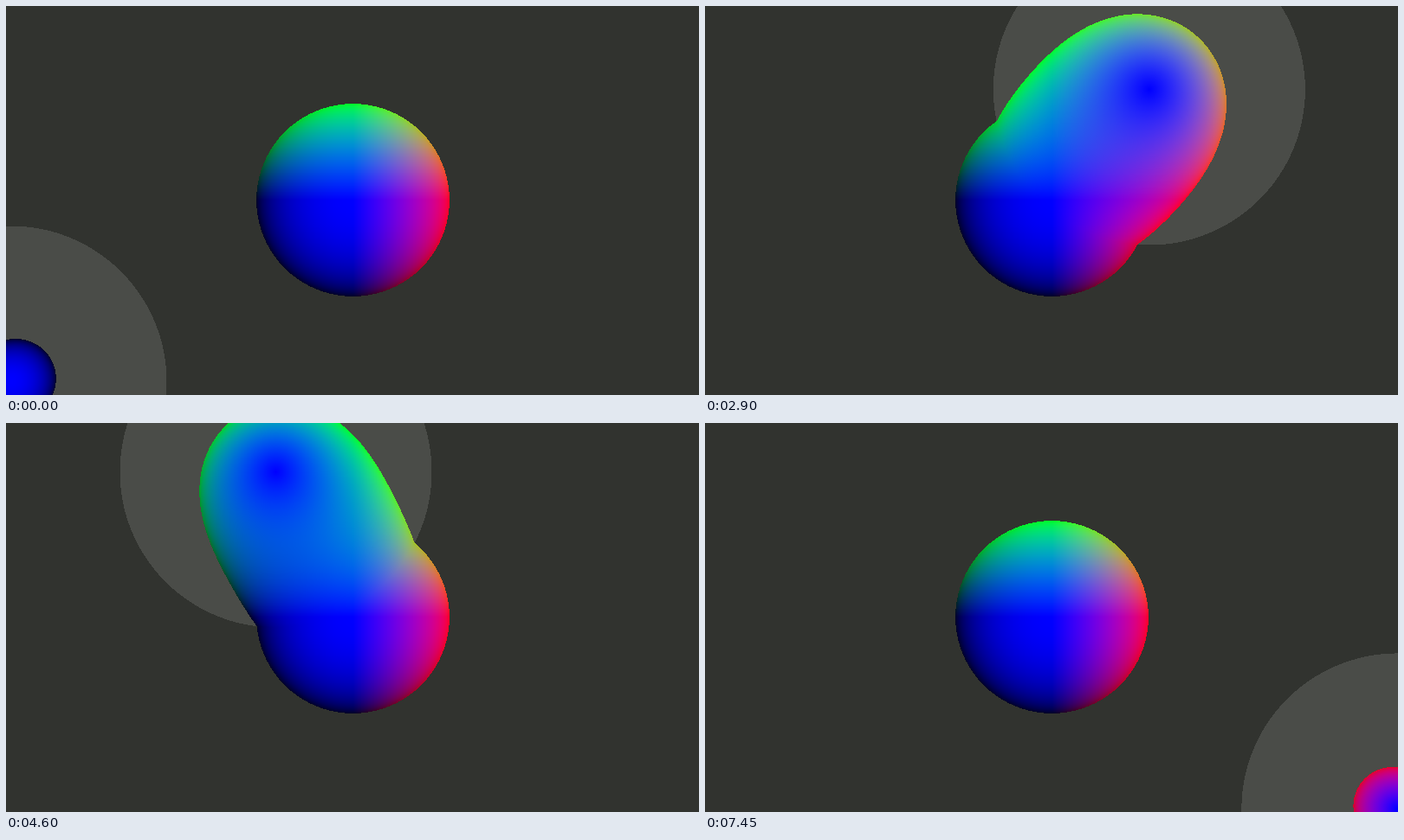
An HTML page with a canvas that plays this animation: 800 px wide and 450 px high, repeating every 7500 ms.

```html
<!DOCTYPE html>
<html lang="en">
<head>
<meta charset="utf-8">
<title>Merging blobs</title>
<style>
  html, body { margin: 0; width: 100%; height: 100%; overflow: hidden; background: #31332f; }
  canvas { display: block; width: 800px; height: 450px; }
</style>
</head>
<body>
<canvas id="stage" width="800" height="450"></canvas>
<script>
const W = 800, H = 450, LOOP = 7500, STEP = 50;
const CX = 400, CY = 225, CORE = 111.4, REACH = 180;
const BACK = [49, 51, 47], HALO = [74, 76, 72];

// Key points of the moving blob: time, x, y
const path = [
  [0, 5, 435], [900, 6, 434], [1450, 42, 403], [2150, 166, 217],
  [2700, 405, 62], [3200, 646, 208], [3600, 600, 358], [4000, 358, 398],
  [4280, 210, 272], [4600, 311, 57], [5000, 605, 98], [6050, 738, 418],
  [6500, 768, 435], [7500, 799, 447]
];

// The path starts and ends at rest
function slope(i, axis) {
  const a = path[i - 1], b = path[i + 1];
  return a && b ? (b[axis] - a[axis]) / (b[0] - a[0]) : 0;
}

function position(t) {
  const i = path.findIndex(key => key[0] > t) - 1;
  const a = path[i], b = path[i + 1], span = b[0] - a[0];
  const u = (t - a[0]) / span, v = 1 - u;
  return [1, 2].map(axis =>
    a[axis] * (1 + 2 * u) * v * v + b[axis] * (3 - 2 * u) * u * u +
    span * u * v * (slope(i, axis) * v - slope(i + 1, axis) * u));
}

const ctx = document.getElementById("stage").getContext("2d");
const image = ctx.createImageData(W, H);
const data = image.data;
data.fill(255);

function put(at, r, g, b) {
  data[at] = r;
  data[at + 1] = g;
  data[at + 2] = b;
}

function draw(t) {
  const [bx, by] = position(t);
  for (let y = 0, at = 0; y < H; y++) {
    // Pixels are sampled at their lower left corner
    const dy = y + 1 - CY, ey = y + 1 - by;
    for (let x = 0; x < W; x++, at += 4) {
      const dx = x - CX, ex = x - bx;
      const far = Math.hypot(dx, dy) || 1e-6;
      const near = Math.hypot(ex, ey) / REACH;
      // The blob scales the core's distance down within its reach
      const pull = near < 1 ? near * (0.955 + 0.045 * near ** 3) : 1;
      const k = far / CORE * pull;
      if (k < 1) {
        const n = k * 0.99, side = 255 * n / far;
        put(at, Math.max(0, dx * side), Math.max(0, -dy * side), 255 * Math.sqrt(1 - n * n));
      } else {
        put(at, ...(near < 1 ? HALO : BACK));
      }
    }
  }
  ctx.putImageData(image, 0, 0);
}

const start = performance.now();
let shown = -1;

function tick() {
  const t = Math.floor((performance.now() - start) % LOOP / STEP) * STEP;
  if (t !== shown) draw(shown = t);
  requestAnimationFrame(tick);
}
tick();
</script>
</body>
</html>
```
